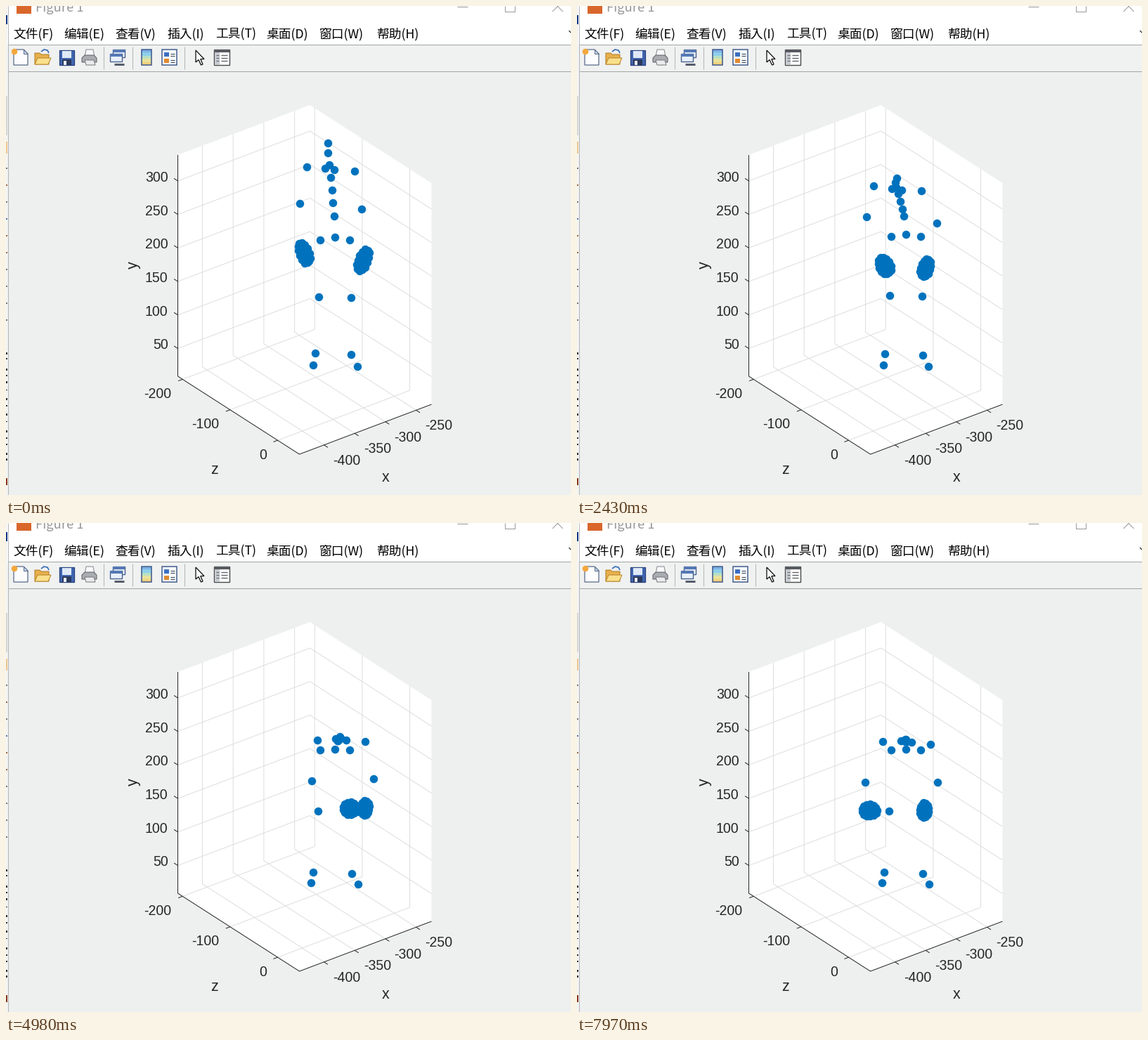
Recreate the animation shown at these times as a matplotlib script. Size 804 px wide and 696 px high, loop 8000 ms.

```python
import random

import numpy as np
import matplotlib.pyplot as plt
from matplotlib.animation import FuncAnimation
from matplotlib.collections import LineCollection
from matplotlib.patches import Circle, Polygon, Rectangle

W, H, DPI = 804, 696, 96
STEP, LOOP = 50, 8000
N = LOOP // STEP
INK, GRID, PANEL = "#262626", "#dedede", "#eef0f0"
BLUE = "#0072bd"
CJK = "Noto Sans CJK JP"

fig = plt.figure(figsize=(W / DPI, H / DPI), dpi=DPI, facecolor=PANEL)
ax = fig.add_axes([0, 0, 1, 1])
ax.set_xlim(0, W)
ax.set_ylim(H, 0)
ax.axis("off")


def pt(px):
    return px * 72 / DPI


def box(x, y, w, h, fill, edge="none", lw=1):
    ax.add_patch(Rectangle((x, y), w, h, facecolor=fill, edgecolor=edge, linewidth=pt(lw)))


def poly(points, fill, edge="none", lw=1):
    ax.add_patch(Polygon(points, facecolor=fill, edgecolor=edge, linewidth=pt(lw)))


def lines(segs, color, lw=1.0):
    ax.add_collection(LineCollection(segs, colors=color, linewidths=pt(lw)))


def rows(x0, x1, ys, color, lw=1.2):
    lines([[(x0, y), (x1, y)] for y in ys], color, lw)


def text(x, y, s, size, color=INK, ha="left", font="Liberation Sans"):
    ax.text(x, y, s, fontsize=pt(size), color=color, ha=ha, va="baseline", family=font)


# ---- window chrome ----
def title_bar():
    box(0, 0, W, 55, "white")
    box(15, -8, 21, 19, "#d9662b")
    text(42, 7.5, "Figure 1", 18.4, "#999999", font=CJK)
    lines([[(642, 0.5), (657, 0.5)],
           [(709.5, 0), (709.5, 7.5), (723.5, 7.5), (723.5, 0)],
           [(777.5, 8), (785.5, 0)], [(792.5, 8), (784.5, 0)]], "#999999")


def menu_bar():
    menu = {"文件(F)": 10, "编辑(E)": 82, "查看(V)": 155, "插入(I)": 230,
            "工具(T)": 298, "桌面(D)": 370, "窗口(W)": 446, "帮助(H)": 527}
    for name, x in menu.items():
        text(x, 45, name, 17.8, "black", font=CJK)
    lines([[(801, 35), (804, 38)]], "#333333", 1.3)


def file_icons():
    # new, open, save, print
    poly([(11, 62), (25, 62), (31, 68), (31, 84), (11, 84)], "#fdfdff", "#5b6f8d", 1.3)
    poly([(25, 62), (25, 68), (31, 68)], "#c8d6ea", "#5b6f8d")
    ax.add_patch(Circle((12, 65), 3.6, color="#f3a83c"))
    poly([(41, 83), (41, 67), (48, 67), (50, 69), (61, 69), (61, 83)], "#e8b04c", "#b07a24")
    poly([(41, 83), (45, 74), (64, 74), (60, 83)], "#fbe08c", "#b8862c")
    lines([[(50, 65), (54, 62), (59, 63), (61, 67)]], "#3f72b8", 1.8)
    box(76, 63, 21, 21, "#4166b0", "#27427c", 1.3)
    box(80, 63.5, 13, 10, "#dfe9f8")
    box(80, 76, 13, 8, "#2c3a5c")
    box(82, 77.5, 4, 6, "#e8edf5")
    poly([(112, 72), (114, 62), (124, 62), (126, 72)], "#f8faff", "#888888")
    poly([(108, 74), (112, 70), (125, 70), (129, 74), (129, 80), (108, 80)], "#a9acb1", "#5c6066")
    poly([(112, 77), (125, 77), (127, 84), (114, 84)], "#e9ebee", "#777777")


def view_icons():
    # linked windows
    for x, y in ((152, 62), (148, 68)):
        box(x, y, 17, 11, "#e8f0fa", "#47628f", 1.4)
        box(x, y, 17, 3.5, "#5478b4")
    rows(154, 168, [83], "#555e6c", 3)
    # colour bar
    for k, shade in enumerate(["#7fb2e6", "#8ed0ec", "#b9dfc4", "#e7e29a", "#f6cf7c"]):
        box(193, 62 + 4.4 * k, 14, 4.5, shade)
    box(193, 62, 14, 22, "none", "#3a5688", 1.5)
    # legend
    box(222, 62, 21, 22, "#f8fbff", "#3f5b8c", 1.5)
    box(225, 66, 7, 6, "#3c6fc0")
    box(225, 75, 7, 6, "#e08a30")
    rows(234, 240, (67.5, 70.5, 76.5, 79.5), "#47525f")
    # pointer
    poly([(270, 63), (270, 80), (274, 76.5), (277.5, 84), (280, 83), (276.8, 75.5), (282, 75.5)],
         "white", "#111111", 1.3)
    # inspector
    box(296, 62, 22, 22, "#fbfbfb", "#4a4a4a", 1.4)
    box(296, 62, 22, 4, "#555a60")
    box(297, 66, 7, 17.5, "#c8ccd2")
    rows(306, 315, (70, 74, 78), "#55595f")
    rows(298.5, 302.5, (70, 74, 78), "#666b72")


def toolbar():
    box(0, 55, W, 38, "#f0f1f1")
    rows(3, W, (54.5, 92.5), "#a3a5a5", 1)
    lines([[(x, 58), (x, 90)] for x in (138.5, 179.5, 253.5)], "#b4b6b6")
    file_icons()
    view_icons()


def window_edges():
    rng = random.Random(4)
    box(0, 0, 2, H, "#f4f4f4")
    box(0, 13, 2, 13, "#0b3a86")
    box(0, 128, 2, 56, "#d5d7d9")
    box(0, 193, 2, 17, "#eec894")
    for y in range(230, 470, 24):
        box(0, y, 2, 2, rng.choice(["#777777", "#a06a40", "#5577aa"]))
    for y in range(490, 650, 11):
        box(0, y + rng.randint(0, 4), 2, rng.randint(1, 4), "#333333")
    box(0, 672, 2, 10, "#8c3b20")
    lines([[(x, 0), (x, H)] for x in (2.5, W - 0.5)], "#b4b6b7")


# ---- 3-D axes drawn as a fixed projection ----
LEFT = np.array([244.5, 527])
FRONT = np.array([417.5, 638])
RIGHT = np.array([605.5, 567])
BACK = LEFT + RIGHT - FRONT
UP = np.array([0, -315])
Z_DIR, X_DIR = FRONT - LEFT, RIGHT - FRONT


def axes3d():
    poly([LEFT, LEFT + UP, BACK + UP, RIGHT + UP, RIGHT, FRONT], "white")
    out_z = Z_DIR / np.hypot(*Z_DIR) * 6.5
    out_x = X_DIR / np.hypot(*X_DIR) * 6.5
    grid, ticks = [], []
    for k in range(4):
        step = X_DIR * (35 + 43.7 * k) / 188
        p, q = LEFT + step, FRONT + step
        grid.append([p + UP, p, q])
        ticks.append([q, q + out_z])
        text(q[0] + 12.5, q[1] + 28.2, str(-400 + 50 * k), 19.5)
    for k in range(3):
        step = Z_DIR * (0.039 + 0.391 * k)
        p, q = BACK + step, LEFT + step
        grid.append([p + UP, p, q])
        ticks.append([q, q - out_x])
        text(q[0] - 15.5, q[1] + 26.5, str(-200 + 100 * k), 19.5, ha="right")
    for k in range(6):
        rise = np.array([0, -39.5 - 47.7 * k])
        p = LEFT + rise
        grid.append([p, BACK + rise, RIGHT + rise])
        ticks.append([p, p - out_z])
        text(p[0] - 14, p[1] + 1, str(50 + 50 * k), 19.5, ha="right")
    lines(grid, GRID)
    lines(ticks, INK)
    lines([[LEFT + UP, LEFT, FRONT, RIGHT]], INK)
    text(540, 677, "x", 21.5, ha="center")
    text(297, 666, "z", 21.5, ha="center")
    ax.text(181, 369, "y", fontsize=pt(21.5), color=INK, rotation=90,
            ha="center", va="center", family="Liberation Sans")


# ---- motion: every joint follows a few body-wide signals ----
KEYS = np.array([0, 930, 2430, 3790, 4980, 6390, 7970.0])
TIMES = np.arange(N) * STEP


def smooth(*v):
    """Monotone cubic through the key values, sampled at every frame."""
    v = np.array(v, float)
    h = np.diff(KEYS)
    d = np.diff(v) / h
    m = np.r_[d[0], np.zeros(len(d) - 1), d[-1]]
    prod, total = d[:-1] * d[1:], d[:-1] + d[1:]
    m[1:-1] = np.where(prod > 0, 2 * prod / np.where(total == 0, 1, total), 0)
    i = np.clip(np.searchsorted(KEYS, TIMES, side="right") - 1, 0, len(h) - 1)
    s = (TIMES - KEYS[i]) / h[i]
    return (v[i] * (1 + 2 * s) * (1 - s) ** 2 + v[i + 1] * s * s * (3 - 2 * s)
            + h[i] * s * (1 - s) * (m[i] * (1 - s) - m[i + 1] * s))


bend = smooth(0, .025, .455, .885, .965, .99, 1)
sway = smooth(0, -1.5, -6, 5, 15.5, 20, 6.5)
reach = smooth(0, 1.5, 20, 38, 50.5, 56, -15.5)
hump = 4 * bend * (1 - bend)
flare = np.exp(-((TIMES - 1620) / 360) ** 2)


def joint(x, y, drop, lag=0, side=0, lead=0, follow=0, tilt=0):
    """Rest place plus a share of each signal: down, late, sideways."""
    px = x + side * sway + lead * bend + follow * reach
    py = y + drop * bend - lag * hump + tilt * sway
    return np.column_stack([px, py])


def spine():
    neck = joint(462, 243, 68, 7, side=0.8)
    waist = joint(467, 298, 13, 5, side=0.3)
    head = [joint(458, 194, 114, side=0.8, lead=5),
            joint(458, 208, 100, 2, side=1, lead=2),
            joint(460.3, 225, 84, 5, side=1)]
    collar = [joint(454, 230, 80, 6, side=1), joint(467, 232, 80, 6, side=1, lead=2)]
    return head + collar + [neck + (waist - neck) * k / 3 for k in range(4)]


def arms():
    elbow_r = joint(506, 288, 81, 16, side=1)
    elbow_r[:, 0] += 12 * hump
    return [joint(428, 228, 81, 8, side=1, tilt=0.2),
            joint(496, 234, 81, 8, side=1),
            joint(418, 280, 86, 17, side=1, lead=-11, follow=0.24, tilt=0.4),
            elbow_r]


def legs():
    hips = [joint(467.5, 328, -7), joint(446.5, 332, -10), joint(488.5, 332, -10)]
    knees = [joint(445, 413, -3.5, lead=-0.7), joint(491, 414, -4, lead=-1)]
    ankles = [joint(440, 493, 4, lead=-3.5), joint(491, 495, 4, lead=1.5)]
    toes = [joint(437, 510, 2, lead=-3), joint(499.5, 512, 1.5, lead=2)]
    return hips + knees + ankles + toes


def hand(center, mirror, rx, ry, swing, seed, count=13):
    """Ring of fingertips that leans while open and rounds off as the body bends."""
    rng = random.Random(seed)
    lean = 1 - bend
    dots = []
    for k in range(count + 4):
        if k < count:
            a, r = 2 * np.pi * k / count, rng.uniform(0.92, 1.02)
        else:
            a, r = np.pi / 2 * k, 0.45
        u = r * ((1 - 0.2 * lean) * np.cos(a) + 0.45 * lean * np.sin(a))
        offset = np.column_stack([mirror * rx * u + swing * flare, ry * r * np.sin(a)])
        dots.append(center + offset)
    return dots


hand_l = hand(joint(424, 351, 57, 7, side=1, follow=1, tilt=0.05), 1,
              9.5 + bend, 15 - 6 * bend, -7, seed=2)
hand_r = hand(joint(508, 361, 47, 10, side=1, lead=-19, follow=0.11), -1,
              9.5 - 3 * bend, 15 - 5 * bend, 13, seed=5)

title_bar()
menu_bar()
toolbar()
window_edges()
axes3d()

joints = np.stack(spine() + arms() + legs() + hand_l + hand_r, axis=1) + (0, 0.5)
dots, = ax.plot([], [], "o", color=BLUE, markersize=pt(11.5), markeredgewidth=0, zorder=5)


def draw(i):
    dots.set_data(joints[i, :, 0], joints[i, :, 1])
    return dots,


anim = FuncAnimation(fig, draw, frames=N, init_func=lambda: draw(0),
                     interval=STEP, repeat=True, repeat_delay=0)
plt.show()
```
